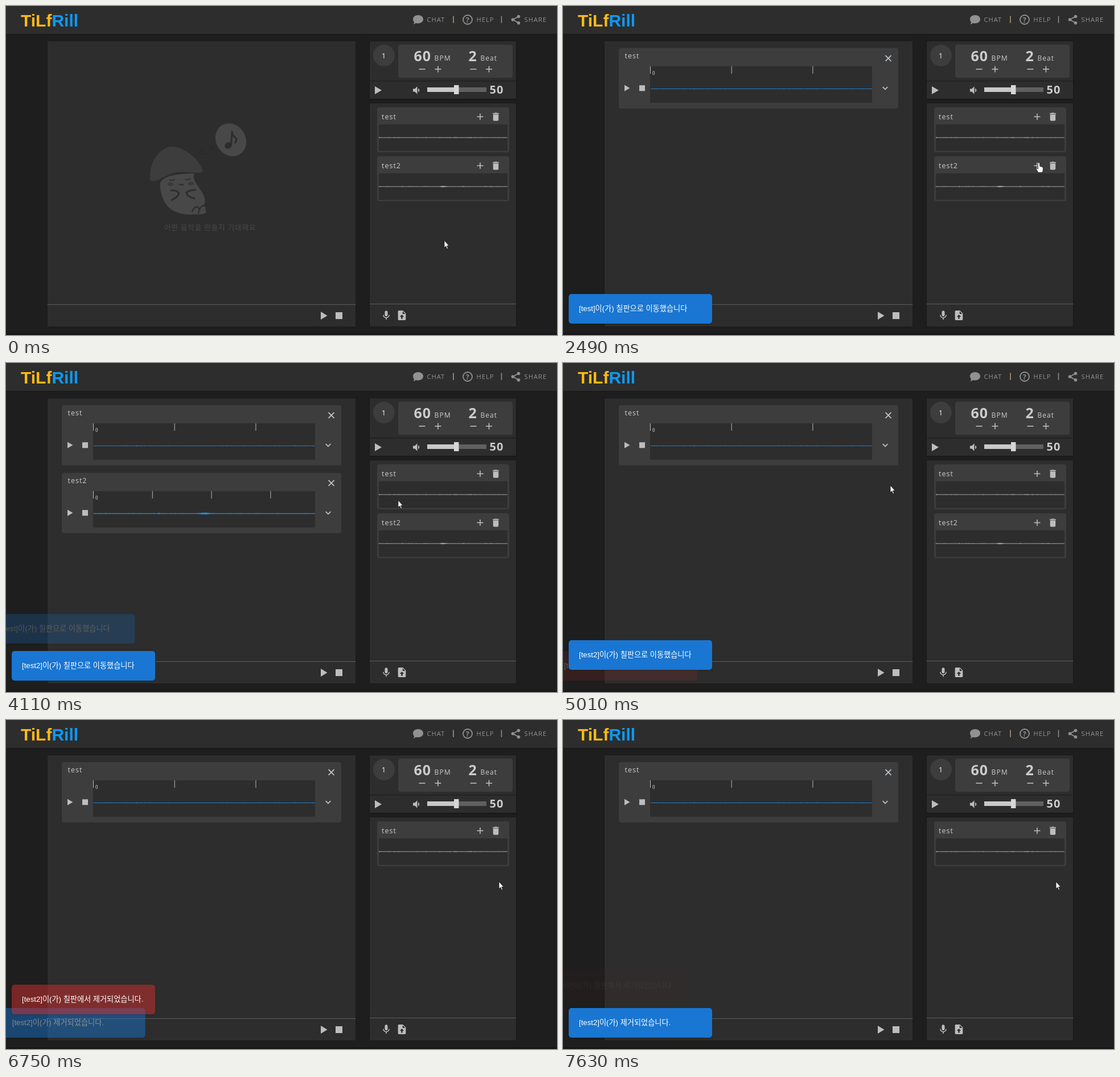
These frames come from a looping animation (968 by 578 pixels, 8.34 s). An HTML page:

```html
<!DOCTYPE html>
<html lang="ko">
<head>
<meta charset="utf-8">
<title>Music board</title>
<style>
html, body { margin: 0; width: 100%; height: 100%; overflow: hidden; background: #1e1e1e; }
#stage { position: relative; width: 968px; height: 578px; overflow: hidden; }
svg { position: absolute; left: 0; top: 0; }
text { font-family: "Open Sans", "Noto Sans", "Noto Sans CJK KR", sans-serif; letter-spacing: 1px; fill: #ccc; }
.toast {
  position: absolute; left: 10px; top: 505.5px; width: 251.5px; height: 52.5px;
  box-sizing: border-box; padding-left: 18px; border-radius: 5px; opacity: 0;
  font: 13.2px/51px "Liberation Sans", "Noto Sans CJK KR", sans-serif;
  color: #fff; white-space: nowrap; box-shadow: 0 1px 4px rgba(0,0,0,.12);
}
</style>
</head>
<body>
<div id="stage"><svg id="scene" width="968" height="578"></svg></div>
<script>
const LOOP = 8340;
const stage = document.getElementById('stage');
const scene = document.getElementById('scene');

const rect = (x, y, w, h, fill, r = 0) =>
  `<rect x="${x}" y="${y}" width="${w}" height="${h}" rx="${r}" fill="${fill}"/>`;
const label = (s, x, y, size, attrs = '') =>
  `<text x="${x}" y="${y}" font-size="${size}" ${attrs}>${s}</text>`;
const line = (d, color, w = 1, attrs = '') =>
  `<path d="${d}" fill="none" stroke="${color}" stroke-width="${w}" ${attrs}/>`;
const shape = (d, fill) => `<path d="${d}" fill="${fill}"/>`;
const icon = (d, cx, cy, size, fill = '#bdbdbd') =>
  `<path d="${d}" fill="${fill}" fill-rule="evenodd" transform="translate(${cx - size / 2} ${cy - size / 2}) scale(${size / 24})"/>`;
const minus = (x, y, r = 5.5) => line(`M${x - r} ${y}h${2 * r}`, '#bdbdbd', 1.6);
const plus = (x, y, r = 5.5) => minus(x, y, r) + line(`M${x} ${y - r}v${2 * r}`, '#bdbdbd', 1.6);
const play = (x, y, w, h) => shape(`M${x} ${y - h / 2}l${w} ${h / 2}l${-w} ${h / 2}z`, '#bdbdbd');
const dots = (x, y, w) => line(`M${x} ${y}h${w}`, '#8c8c8c', 1, 'stroke-dasharray="1 1"');

const ICON = {
  trash: 'M6 19c0 1.1.9 2 2 2h8c1.1 0 2-.9 2-2V7H6zM19 4h-3.5l-1-1h-5l-1 1H5v2h14z',
  mic: 'M12 14c1.66 0 3-1.34 3-3V5c0-1.66-1.34-3-3-3S9 3.34 9 5v6c0 1.66 1.34 3 3 3zm5.3-3c0 3-2.54 5.1-5.3 5.1S6.7 14 6.7 11H5c0 3.41 2.72 6.23 6 6.72V21h2v-3.28c3.28-.48 6-3.3 6-6.72z',
  upload: 'M14 2H6c-1.1 0-2 .9-2 2v16c0 1.1.9 2 2 2h12c1.1 0 2-.9 2-2V8zM12 10.5l4.5 4.5h-3v4h-3v-4h-3zM13.5 3.5V9H19z',
  volume: 'M3 9v6h4l5 5V4L7 9zm13.5 3c0-1.77-1.02-3.29-2.5-4.03v8.05c1.48-.73 2.5-2.25 2.5-4.02z'
};

function random(seed) {
  return () => (seed = seed * 16807 % 2147483647) / 2147483647;
}

// Nearly silent recording, with a swell of the given height in the middle
function wave(x, y, w, color, base, seed, swell) {
  const rnd = random(seed);
  let d = '';
  for (let i = 0; i < w; i++) {
    const bell = swell * Math.exp(-(((i / w - .5) / .02) ** 2));
    const noise = rnd() < .12 ? .5 * rnd() : 0;
    const h = base + noise + bell * (.6 + .4 * rnd());
    d += `M${x + i + .5} ${(y - h).toFixed(2)}v${(2 * h).toFixed(2)}`;
  }
  return line(d, color);
}

function header() {
  const gray = '#919191';
  return rect(0, 0, 968, 49, '#2d2d2d') + rect(0, 49, 968, 2, '#1a1a1a') +
    `<text x="26" y="35.5" style="font:bold 30px 'Liberation Sans',sans-serif;letter-spacing:0;fill:#fdbb11">TiLf<tspan fill="#0c9af5">Rill</tspan></text>` +
    shape('M724 16C729 16 733 19 733 23.3S729 30.5 724 30.5Q722 30.5 720 30Q718 32 715.5 32.3Q717 30.5 717 28.5Q715 26.5 715 23.3C715 19 719 16 724 16Z', gray) +
    label('CHAT', 739.5, 28.3, 11.2, 'style="fill:#919191"') +
    line('M786 17.5V30', '#b59f6c', 1.5) +
    `<circle cx="811" cy="24" r="8" fill="none" stroke="${gray}" stroke-width="1.8"/>` +
    label('?', 808, 28.5, 12, 'font-weight="bold" style="fill:#919191;letter-spacing:0"') +
    label('HELP', 826.5, 28.3, 11.2, 'style="fill:#919191"') +
    line('M870.5 17.5V30', gray, 1.5) +
    line('M901 18L890.5 24L901 30', gray, 1.8) +
    [[900.5, 18.5], [890.5, 24], [900.5, 29.8]].map(([x, y]) => `<circle cx="${x}" cy="${y}" r="2.8" fill="${gray}"/>`).join('') +
    label('SHARE', 910.5, 28.3, 11.2, 'style="fill:#919191"');
}

function panels() {
  return rect(72, 61, 543, 503, '#1a1a1a') + rect(73, 62, 541, 501, '#2d2d2d') +
    dots(73, 524.5, 541) + play(553, 544, 11.5, 14) + rect(579, 538, 12, 12, '#bdbdbd') +
    rect(638, 61, 259, 104, '#191919') + rect(639, 62, 257, 101, '#2d2d2d') +
    rect(639, 131, 257, 1.5, '#202020') +
    `<circle cx="664" cy="87" r="19" fill="#3d3d3d"/>` + label('1', 660, 92, 12.5, 'style="fill:#fff"') +
    rect(689, 68, 201, 58, '#3d3d3d', 4) +
    label('60', 716.5, 96.5, 25, 'font-weight="bold"') + label('BPM', 752.5, 96, 12.2) +
    label('2', 812.5, 96.5, 25, 'font-weight="bold"') + label('Beat', 833.5, 96, 12) +
    minus(731, 111) + plus(759, 111) + minus(821, 111) + plus(848.5, 111) +
    play(648, 148, 12, 14) + icon(ICON.volume, 722.5, 148, 20) +
    rect(740, 143, 51, 8, '#c8c8c8') + rect(791, 143, 53, 8, '#606060') + rect(787, 139, 8.5, 16, '#d6d6d6') +
    label('50', 849.5, 154, 20, 'font-weight="bold"') +
    rect(638, 170, 259, 394, '#191919') + rect(639, 171, 257, 392, '#2d2d2d') +
    dots(639, 523.5, 257) + icon(ICON.mic, 668, 543.5, 20) + icon(ICON.upload, 695.5, 543.5, 20.5) +
    rect(0, 575, 968, 3, '#191518');
}

function mascot() {
  const cap = '#3d3d3d', skin = '#484848', ink = '#2d2d2d';
  const oval = (x, y, rx, ry, fill) => `<ellipse cx="${x}" cy="${y}" rx="${rx}" ry="${ry}" fill="${fill}"/>`;
  return shape('M271 311C276 300 292 295 331 294C327 302 334 312 341 322C350 334 352 345 347 350Q352 353 350 358Q354 363 348 365Q340 367 331 366C308 368 287 361 278 343C272 331 270 321 271 311Z', skin) +
    shape('M253 304C251 273 272 247 292 247C315 247 343 274 346 290C343 296 322 291 303 292C285 293 273 305 262 307Q253 309 253 304Z', cap) +
    oval(289, 313, 5.5, 3.2, '#3a3a3a') + oval(325, 312, 5.5, 3.2, '#3a3a3a') +
    line('M287 305Q291 308 296 305M315 304Q320 307 324 303M304 313Q306 316 308 313Q310 316 312 313', ink, 1.6, 'stroke-linecap="round"') +
    line('M290 324Q299 323 304 329Q302 336 291 341M333 323Q322 323 317 328Q318 335 331 338', ink, 3, 'stroke-linecap="round"') +
    line('M327 361Q331 351 337 353Q341 356 338 364M340 358Q344 349 349 351', ink, 2.2, 'stroke-linecap="round"') +
    `<ellipse cx="395" cy="235" rx="26" ry="30" fill="${skin}" transform="rotate(-32 395 235)"/>` +
    `<ellipse cx="390.5" cy="245" rx="6.5" ry="5.5" fill="${ink}" transform="rotate(-25 390.5 245)"/>` +
    line('M395.5 244L397 220Q398 229 403 231Q407 235 402 241', ink, 3) +
    oval(344, 257, 4, 4, '#272727') + oval(344, 257, 2.5, 2.5, '#303030') + oval(361, 250, 3, 3, '#292929') +
    label('어떤 음악을 만들지 기대돼요', 278, 393.5, 12.4, 'style="fill:#4a4a4a"');
}

function clip(name, y, seed, swell) {
  return rect(652, y, 232, 79, '#3d3d3d', 4) + rect(655, y + 30, 226, 46.5, '#2d2d2d', 1) +
    label(name, 660, y + 21, 12.5) + wave(655, y + 53.2, 226, '#a0a0a0', .5, seed, swell) +
    `<circle class="hover" cx="833" cy="${y + 16.5}" r="14" fill="#494949"/>` +
    plus(833, y + 16.5) + icon(ICON.trash, 860.5, y + 16.5, 19);
}

function track(name, y, gap, color, base, seed, swell) {
  let ticks = '';
  for (let x = 153.5; x < 543; x += gap) ticks += `M${x} ${y + 32}v13`;
  return rect(98, y, 491, 106, '#3d3d3d', 4) + rect(153, y + 32, 390, 64, '#2d2d2d') +
    label(name, 108.5, y + 18, 12.5) + line(ticks, '#b8b8b8') +
    `<text x="157" y="${y + 46.5}" style="font:8px 'Noto Serif',serif;letter-spacing:0">0</text>` +
    wave(154, y + 71.5, 389, color, base, seed, swell) +
    play(108, y + 70.3, 9.5, 11) + rect(134, y + 65.3, 10, 10, '#bdbdbd') +
    line(`M566.5 ${y + 12.8}l10 10m0-10l-10 10`, '#bfc8d0', 1.7) +
    line(`M561.7 ${y + 68.2}l4.3 4.2l4.3-4.2`, '#bdbdbd', 1.8);
}

const group = (id, body) => `<g id="${id}">${body}</g>`;
scene.innerHTML = header() + panels() + group('mascot', mascot()) +
  group('clip1', clip('test', 178, 11, 0)) + group('clip2', clip('test2', 264, 29, .8)) +
  group('track1', track('test', 74, 142.7, '#1c7cc6', .5, 17, 0)) +
  group('track2', track('test2', 193, 103.8, '#1292ea', .65, 43, 1.3));

// Rows are [ms, value, easing]
function run(el, prop, rows) {
  const first = rows[0], last = rows[rows.length - 1];
  if (first[0] > 0) rows = [[0, first[1]], ...rows];
  if (last[0] < LOOP) rows = [...rows, [LOOP, last[1]]];
  el.animate(rows.map(([ms, value, easing = 'linear']) => ({ offset: ms / LOOP, [prop]: value, easing })),
    { duration: LOOP, iterations: Infinity });
}

// Visible only within the given [from, to] spans
function show(el, ...spans) {
  const rows = spans[0][0] > 0 ? [[0, 0, 'step-end']] : [];
  for (const [from, to] of spans) {
    rows.push([from, 1, 'step-end']);
    if (to < LOOP) rows.push([to, 0, 'step-end']);
  }
  run(el, 'opacity', rows);
}

function toast(text, color, enter, move, leave) {
  const el = document.createElement('div');
  el.className = 'toast';
  el.textContent = text;
  el.style.background = color;
  stage.prepend(el);
  const away = 'translateX(-50px)', home = 'translateX(0)';
  const slide = [[enter, away, 'ease'], [enter + 1000, home]];
  const fade = [[enter, 0, 'cubic-bezier(.35,.05,.4,1)'], [enter + 1000, 1]];
  if (leave) {
    slide.push([leave, home, 'ease'], [leave + 1000, away]);
    fade.push([leave, 1, 'cubic-bezier(.15,.2,.25,1)'], [leave + 1000, 0]);
    run(el, 'top', [[move, '505.5px'], [move + 255, '449.5px', 'step-end'], [leave, '441px']]);
  }
  run(el, 'transform', slide);
  run(el, 'opacity', fade);
}

const blue = '#1976d2', red = 'rgba(211,47,47,.5)';
toast('[test]이(가) 칠판으로 이동했습니다', blue, 1480, 3308, 3690);
toast('[test2]이(가) 칠판으로 이동했습니다', blue, 3110, 4928, 5320);
toast('[test2]이(가) 칠판에서 제거되었습니다.', red, 4730, 6568, 6930);
toast('[test2]이(가) 제거되었습니다.', blue, 6370);
stage.prepend(scene);

const $ = id => document.getElementById(id);
show($('mascot'), [0, 1510]);
show($('track1'), [1510, LOOP]);
show($('track2'), [3140, 4760]);
show($('clip2'), [0, 6400]);
const [hover1, hover2] = document.querySelectorAll('.hover');
show(hover1, [1100, 2350]);
show(hover2, [3140, 3920]);

const pointer = document.createElementNS('http://www.w3.org/2000/svg', 'svg');
pointer.setAttribute('width', 20);
pointer.setAttribute('height', 24);
pointer.style.overflow = 'visible';
const outline = 'fill="#fff" stroke="#111" stroke-width=".8"';
pointer.innerHTML =
  `<path id="arrow" ${outline} d="M0 0V12.6L2.8 10L4.8 14.8L6.7 14L4.7 9.3H8.4Z"/>
   <path id="hand" ${outline} d="M-1.6 1.5Q-1.6 0 0 0T1.6 1.5V6.6Q3.2 6 3.9 7.2Q5.3 6.8 5.8 8Q7.4 7.9 7.4 9.6V13.2L6.2 17.6H-1L-4.8 11.4Q-4.8 9.5-3 10L-1.6 11.4Z"/>`;
stage.append(pointer);

const path = [
  [0, 770, 412], [20, 770, 412], [370, 793, 330], [550, 793, 330], [1100, 836, 189],
  [2330, 836, 189], [2490, 836, 275], [3880, 836, 275], [4310, 575, 215],
  [5080, 575, 215], [5590, 852, 286], [5860, 866, 284]
];
run(pointer, 'transform', path.map(([ms, x, y]) => [ms, `translate(${x}px,${y}px)`, 'ease-in-out']));
show($('arrow'), [0, 1040], [2380, 2450], [3920, 4270], [4760, 5570], [6400, LOOP]);
show($('hand'), [1040, 2380], [2450, 3920], [4270, 4760], [5570, 6400]);
</script>
</body>
</html>
```
